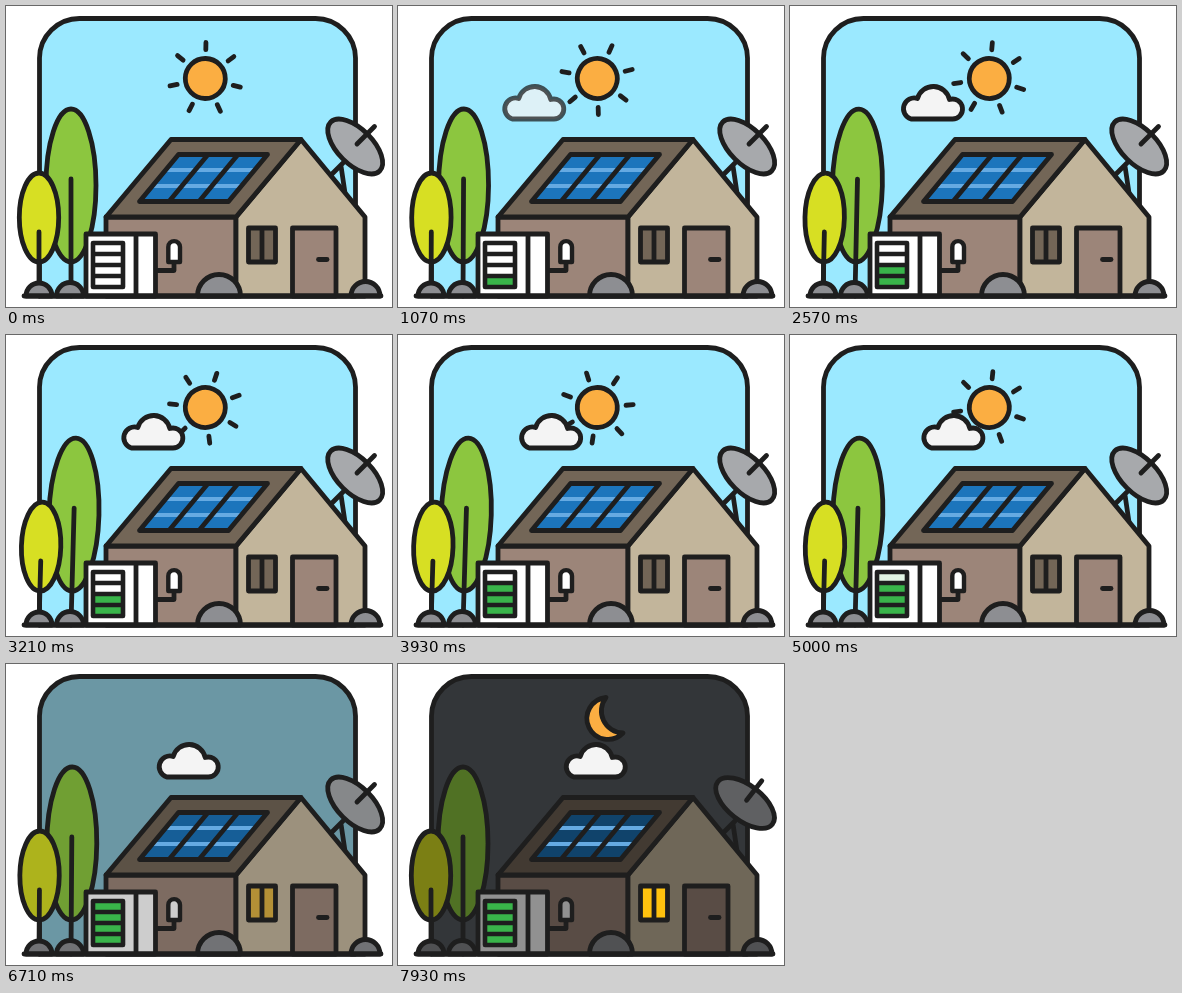
An HTML page with a canvas for the animation above (8000 ms loop, 386 by 301 pixels).

```html
<!DOCTYPE html>
<html lang="en">
<head>
<meta charset="utf-8">
<title>Solar house, day to night</title>
<style>
  html, body { margin: 0; width: 100%; height: 100%; overflow: hidden; background: #fff; }
  canvas { display: block; width: 386px; height: 301px; }
</style>
</head>
<body>
<canvas></canvas>
<script>
const W = 386, H = 301, LOOP = 8000;
const INK = '#1e1e1e', RAD = Math.PI / 180;
const canvas = document.querySelector('canvas');
const ctx = canvas.getContext('2d');
const scale = window.devicePixelRatio || 1;
canvas.width = W * scale;
canvas.height = H * scale;

const clamp = v => Math.min(1, Math.max(0, v));
const progress = (t, from, to) => clamp((t - from) / (to - from));
const ease = p => p * p * (3 - 2 * p);
const channels = hex => [1, 3, 5].map(i => parseInt(hex.slice(i, i + 2), 16));
function mix(a, b, p) {
  const to = channels(b);
  return `rgb(${channels(a).map((v, i) => Math.round(v + (to[i] - v) * p))})`;
}

function draw(path, fill, width = 4.8) {
  const shape = typeof path === 'string' ? new Path2D(path) : path;
  if (fill) { ctx.fillStyle = fill; ctx.fill(shape); }
  if (width) { ctx.lineWidth = width; ctx.strokeStyle = INK; ctx.stroke(shape); }
}

function ellipse(x, y, rx, ry = rx, angle = 0) {
  const path = new Path2D();
  path.ellipse(x, y, rx, ry, angle, 0, 2 * Math.PI);
  return path;
}

function at(x, y, degrees, paint) {
  ctx.save();
  ctx.translate(x, y);
  ctx.rotate(degrees * RAD);
  paint();
  ctx.restore();
}

function sun(t) {
  const y = 72.5 + 110 * ease(progress(t, 5050, 6700));
  at(199.3, y, 1 + 0.0215 * t, () => {
    for (let i = 0; i < 7; i++) {
      draw('M0 -28.8V-36');
      ctx.rotate(2 * Math.PI / 7);
    }
    draw(ellipse(0, 0, 20), '#fbae42');
  });
}

function moon(t) {
  if (t < 6700) return;
  at(0, 112 * (1 - ease(progress(t, 6700, 7900))), 0, () =>
    draw('M208 33.5A21 21 0 1 0 225 69A22 22 0 0 1 208 33.5Z', '#fbae42'));
}

function cloud(t) {
  const x = 102.1 + 65 * (1 - Math.cos(0.011 * (t + 100) * RAD));
  ctx.globalAlpha = progress(t, 400, 1300);
  if (ctx.globalAlpha) {
    // Flatten fill and outline so they fade as one silhouette.
    at(x, 0, 0, () =>
      draw('M10.5 113A10.5 10.5 0 1 1 17 92.5A16.5 16.5 0 0 1 49 93.5A10 10 0 1 1 51.5 113Z', '#f4f4f4'));
  }
  ctx.globalAlpha = 1;
}

function dish(t, shade) {
  draw('M337 157L324 170M335 160L339 187');
  at(336, 157, -7 * ease(progress(t, 6950, 7900)), () => {
    draw(ellipse(13.2, -16.5, 34.6, 17.5, 45 * RAD), shade('#a7a9ac'));
    draw('M15 -19L32.5 -36.5');
  });
}

function house(shade, night) {
  draw('M100 211H230V290H100Z', shade('#9c8579'));
  draw('M230 211L295 133.5L359 211V290H230Z', shade('#c2b59b'));
  draw('M100 211L165 133.5H295L230 211Z', shade('#736657'));

  const panel = 'M133.5 195.5L172.5 148.5H261.5L222.5 195.5Z';
  draw(panel, shade('#1c75bc'), 0);
  ctx.lineWidth = 4;
  ctx.strokeStyle = '#65aae2';
  ctx.stroke(new Path2D('M160 164H247M147 180H234'));
  draw(panel + 'M202 148.5L163 195.5M232 148.5L193 195.5');

  draw('M242.5 222H269.5V256H242.5ZM256 222V256', mix('#736657', '#ffc20e', night));
  draw('M286.5 222H330V290H286.5Z', shade('#9c8579'));
  draw('M312.5 253.5H321');
}

function tree(x, y, rx, ry, trunkTop, color, degrees) {
  at(x, 290, degrees, () => {
    draw(ellipse(0, y - 290, rx, ry), color);
    draw(`M0 ${trunkTop - 290}V0`);
  });
}

function bush(x, r, color) {
  draw(`M${x - r} 290A${r} ${r} 0 0 1 ${x + r} 290Z`, color);
}

function battery(t, shade) {
  draw('M168 256V264.5H150');
  draw('M162.3 256V241A5.8 5.8 0 0 1 174 241V256Z', shade('#ffffff'), 4.4);
  draw('M80 228H149.5V290H80ZM130 228V290', shade('#ffffff'));
  for (let i = 0; i < 4; i++) {
    const start = 930 + 1350 * i;
    const day = shade('#ffffff');
    ctx.fillStyle = day;
    ctx.fillRect(87, 270 - 11 * i, 30, 11);
    ctx.globalAlpha = progress(t, start, start + 140);
    ctx.fillStyle = '#39b54a';
    ctx.fillRect(87, 270 - 11 * i, 30, 11);
    ctx.globalAlpha = 1;
  }
  draw('M87 237H117V281H87ZM87 248H117M87 259H117M87 270H117', null, 4.6);
}

function render(t) {
  const night = ease(progress(t, 5650, 7900));
  const shade = color => mix(color, '#000000', 0.43 * night);
  const sway = 0.85 * (1 - Math.cos(2 * Math.PI * t / LOOP));

  ctx.setTransform(scale, 0, 0, scale, 0, 0);
  ctx.fillStyle = '#fff';
  ctx.fillRect(0, 0, W, H);
  ctx.lineCap = ctx.lineJoin = 'round';

  draw('M33.5 290V52A40 40 0 0 1 73.5 12.5H309.5A40 40 0 0 1 349.5 52V290Z',
    mix('#9be9ff', '#333639', night));
  sun(t);
  moon(t);
  cloud(t);
  dish(t, shade);
  house(shade, night);
  tree(65, 179.5, 25, 76.5, 173, shade('#8cc63f'), sway);
  tree(33, 211.5, 19.7, 44.5, 226, shade('#d7df23'), sway);

  const stone = shade('#8d8e92');
  bush(33, 13, stone);
  bush(64, 13.5, stone);
  battery(t, shade);
  bush(213, 21.5, stone);
  bush(359.5, 14.5, stone);
  draw('M18 290H375');
}

function frame(now) {
  render(now % LOOP);
  requestAnimationFrame(frame);
}
requestAnimationFrame(frame);
</script>
</body>
</html>
```
